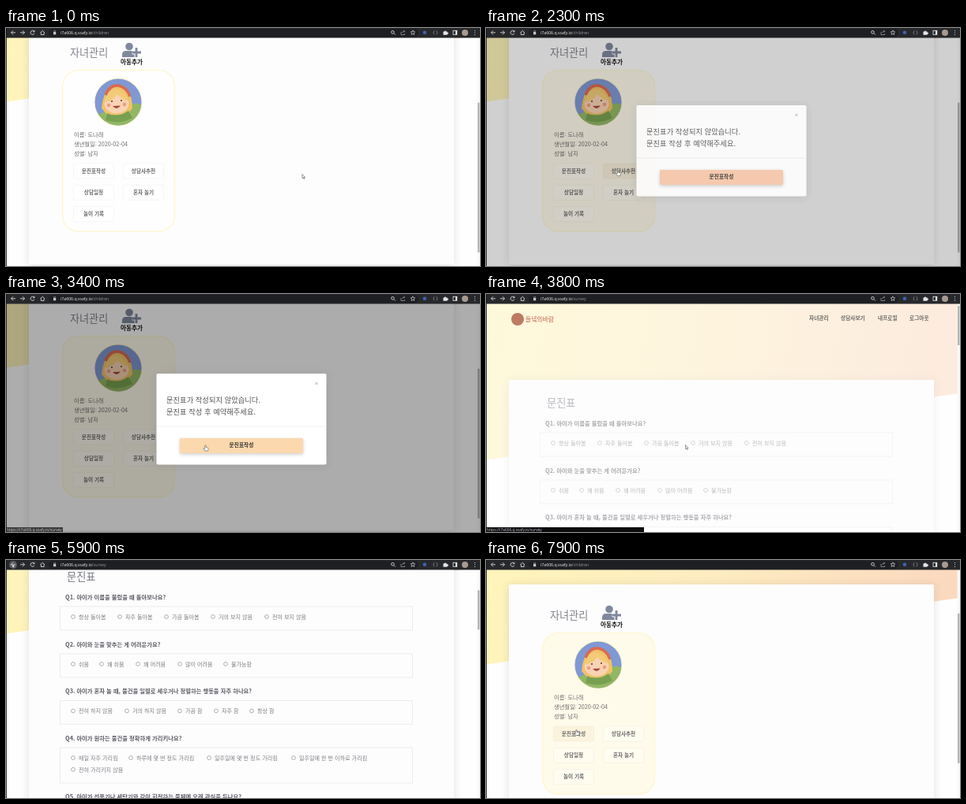
These frames come from a looping animation (600 px wide and 302 px high, 8 s). An HTML page:

```html
<!DOCTYPE html>
<html lang="ko">
<head>
<meta charset="utf-8">
<style>
  html, body { margin: 0; width: 100%; height: 100%; overflow: hidden; background: #fff; }
  svg { display: block; width: 600px; height: 302px; }
  text { font-family: "Noto Sans CJK KR", "Noto Sans CJK", "Noto Sans CJK JP", sans-serif; white-space: pre; }
  .chrome text { font-family: "Open Sans", "Noto Sans", sans-serif; }
</style>
</head>
<body>
<svg viewBox="0 0 600 302">
  <defs>
    <linearGradient id="sky" x1="0" y1="0" x2="1" y2=".06">
      <stop offset="0" stop-color="#fff5ba"/>
      <stop offset=".5" stop-color="#feecc0"/>
      <stop offset="1" stop-color="#fbd9bf"/>
    </linearGradient>
    <filter id="soft" x="-20%" y="-20%" width="140%" height="140%">
      <feDropShadow dx="0" dy="1" stdDeviation="5" flood-color="#445" flood-opacity=".17"/>
    </filter>
    <filter id="lift" x="-20%" y="-60%" width="140%" height="240%">
      <feDropShadow dx="0" dy="1.5" stdDeviation="2" flood-color="#000" flood-opacity=".2"/>
    </filter>
    <clipPath id="face"><circle cx="142" cy="211" r="29.5"/></clipPath>
  </defs>

  <rect width="600" height="302" fill="#fefefe"/>
  <g id="page">
    <g id="fading">
      <path d="M0 0H600V126L0 210.500Z" fill="url(#sky)"/>
      <rect id="sheet" x="29" y="109" width="538" rx="2" fill="#fefdfe" filter="url(#soft)"/>
      <g id="children">
        <g fill="#7f889d">
          <circle cx="156" cy="140.5" r="4.8"/>
          <path d="M147 154v-3q0-5 5-5h8q3 0 4 2v6Z"/>
          <path d="M165 142v12M159.500 148H171" stroke="#fefdfe" stroke-width="5"/>
          <path d="M165 142v12M159.500 148H171" stroke="#7f889d" stroke-width="2.800"/>
        </g>
        <rect id="profile" x="71.500" y="170.500" width="142" height="204.500" rx="20" stroke="#fdf7d6" stroke-width="1.600"/>
        <circle cx="142" cy="211" r="30.500" fill="#fbf3c4"/>
        <g clip-path="url(#face)">
          <rect x="110" y="180" width="64" height="64" fill="#8098d4"/>
          <path d="M110 243l4-13q5-6 14-7l28-8q9-5 16 0l3 28Z" fill="#93b765"/>
          <path d="M121 219q2-23 14-28q12-4 20 6q5 8 5 22l-7 8h-25Z" fill="#f0c269"/>
          <ellipse cx="140" cy="213" rx="15.500" ry="12.500" fill="#f9d3b3"/>
          <path d="M125 211q1-12 12-16q12 0 18 14q-9-1-14-8q-5 8-16 10Z" fill="#f3cb78"/>
          <path d="M126 202q5-13 16-12q11 2 15 14" fill="none" stroke="#d96a50" stroke-width="3.500"/>
          <path d="M128 225q12 7 27-3l5 9q-16 9-34 3Z" fill="#78a050"/>
          <g fill="#4a332e"><circle cx="134" cy="210" r="1"/><circle cx="146" cy="209" r="1"/></g>
          <g fill="#ee9c84"><circle cx="130" cy="215" r="2.300"/><circle cx="150" cy="214" r="2.300"/></g>
          <path d="M135 216q5 6 10-.500Z" fill="#a8483e"/>
        </g>
      </g>
      <g id="survey"></g>
    </g>
    <g id="nav"><circle cx="40" cy="32" r="8" fill="#bd7b62"/></g>
  </g>

  <rect x="596.500" y="13" width="3.500" height="289" fill="#f8f8f8"/>
  <rect id="thumb" x="597" width="2.500" fill="#b4b6b6"/>
  <rect id="dim" y="12" width="600" height="290"/>
  <g id="modal">
    <rect x="190.500" y="101" width="215" height="115.500" rx="2" fill="#fff" filter="url(#soft)"/>
    <path d="M391.500 112l3 3m0-3l-3 3" stroke="#9a9a9a" stroke-width=".7"/>
    <path d="M191 168H405" stroke="#ececee" stroke-width=".8"/>
    <rect id="action" x="220" y="183" width="156" height="19" rx="1.500" filter="url(#lift)"/>
  </g>

  <g class="chrome">
    <rect width="600" height="12.500" fill="#27282b"/>
    <rect x="54" y="1" width="468" height="10.500" rx="5" fill="#1e1f22"/>
    <circle id="backGlow" cx="9" cy="6" r="5" fill="#5a5b5e"/>
    <g fill="none" stroke="#d8d9db" stroke-width=".9">
      <path d="M12 5.800H6.500m2.500-2.500l-2.500 2.500l2.500 2.500M18 5.800h5.500m-2.500-2.500l2.500 2.500l-2.500 2.500"/>
      <path d="M35.500 4.200a2.500 2.500 0 1 0 .4 2.500M36 2.800v2h-2"/>
      <path d="M43.500 6l2.700-2.700L49 6M44.300 5.500v3h3.800v-3"/>
      <circle cx="489.500" cy="5.300" r="1.800"/><path d="M491 6.800l1.800 1.800"/>
      <path d="M500 5v3.500h4.500V7M501.500 6q.5-2 3-2m-1-1.300l1.300 1.300l-1.300 1.300" stroke-width=".7" stroke="#a5a6a9"/>
      <path d="M515 2.800l.8 2 2 .1-1.500 1.400.5 2.100-1.800-1.100-1.800 1.100.5-2.100-1.500-1.400 2-.1Z" stroke-width=".7"/>
      <path d="M542 3.300q-2 2.500 0 5M545 3.300q2 2.500 0 5" stroke="#9a9ca0" stroke-width=".7"/>
    </g>
    <rect x="60" y="5" width="3.200" height="3.300" fill="#c8c9cb"/>
    <path d="M60.600 5v-.7a1 1 0 0 1 2 0V5" fill="none" stroke="#c8c9cb" stroke-width=".6"/>
    <circle cx="530" cy="5.800" r="2.300" fill="#3f63b4"/>
    <path d="M553.500 4.500h1.500a1 1 0 1 1 2 0h1.500v1.300a1 1 0 1 1 0 1.800v1.200h-5Z" fill="#e6e6e8"/>
    <rect x="566" y="3.300" width="4.800" height="5" fill="none" stroke="#eee" stroke-width=".8"/>
    <rect x="569" y="3.300" width="2" height="5" fill="#eee"/>
    <circle cx="581" cy="6" r="4" fill="#a89a90"/>
    <path d="M593.500 3v.9m0 1.600v.9m0 1.600v.9" stroke="#ddd" stroke-width="1"/>
    <text x="69" y="7.800" font-size="5.200" fill="#f1f1f1">i7a606.q.ssafy.io<tspan id="path" fill="#96989c"></tspan></text>
    <g id="status">
      <rect id="statusBox" y="296" height="6" fill="#0c0c0e"/>
      <text x="1" y="300.500" font-size="4.800" fill="#c2c4c8">https://i7a606.q.ssafy.io/survey</text>
    </g>
  </g>
  <rect width=".8" height="302" fill="#111"/>
  <g id="cursor" stroke="#555" stroke-width=".6" stroke-linejoin="round" fill="#fff">
    <path id="arrow" d="M0 0v5.200l1.200-1 .9 1.900 .8-.4-.9-1.800h1.600Z"/>
    <path id="hand" d="M-.7.700q.7-1 1.400 0v2.500l2.500.6q.6.300.4 1.200l-.5 2.500H-.6l-2-2.800q.2-.9 1.900.2Z"/>
  </g>
</svg>
<script>
const SVG = "http://www.w3.org/2000/svg";
const $ = id => document.getElementById(id);
const set = (node, attrs) => { for (const k in attrs) node.setAttribute(k, attrs[k]); return node; };
const add = (parent, tag, attrs) => parent.appendChild(set(document.createElementNS(SVG, tag), attrs));

// y is the vertical middle of the line
function label(parent, str, x, y, size, fill, weight = 400, anchor = "start") {
  add(parent, "text", { x, y: y + size * 0.36, "font-size": size, fill,
    "font-weight": weight, "text-anchor": anchor }).textContent = str;
}

const children = $("children"), survey = $("survey"), nav = $("nav"), modal = $("modal");

label(nav, "들녘의바람", 50, 32.5, 7.8, "#c2604f", 500);
[["자녀관리", 409], ["상담사보기", 449], ["내프로필", 496], ["로그아웃", 536]]
  .forEach(([s, x]) => label(nav, s, x, 30.5, 6.7, "#6c6a68", 700));

label(children, "자녀관리", 81, 148, 13.1, "#80828a", 500);
label(children, "아동추가", 145, 160, 7.6, "#151515", 700);
["이름: 도나래", "생년월일: 2020-02-04", "성별: 남자"]
  .forEach((s, i) => label(children, s, 86, 252.5 + i * 11.8, 7.25, "#6c6c6c"));
const buttons = ["문진표작성", "상담사추천", "상담일정", "혼자 놀기", "놀이 기록"].map((s, i) => {
  const x = 111 + (i % 2) * 63, y = 298.5 + (i >> 1) * 27.3;
  const box = add(children, "rect", { x: x - 25.5, y: y - 9.5, width: 51, height: 19, rx: 2,
    stroke: "#a09c8c", "stroke-opacity": 0.11, "stroke-width": 0.8 });
  label(children, s, x, y, 6.6, "#6a6a6a", 700, "middle");
  return box;
});

const questions = [
  ["아이가 이름을 불렀을 때 돌아보나요?", 164,
    ["항상 돌아봄", 85], ["자주 돌아봄", 144], ["가끔 돌아봄", 203], ["거의 보지 않음", 262], ["전혀 보지 않음", 330]],
  ["아이와 눈을 맞추는 게 어려운가요?", 224,
    ["쉬움", 85], ["꽤 쉬움", 121], ["꽤 어려움", 167], ["많이 어려움", 220], ["불가능함", 278]],
  ["아이가 혼자 놀 때, 물건을 일렬로 세우거나 정렬하는 행동을 자주 하나요?", 283.5,
    ["전혀 하지 않음", 85], ["거의 하지 않음", 153], ["가끔 함", 220], ["자주 함", 266], ["항상 함", 311]],
  ["아이가 원하는 물건을 정확하게 가리키나요?", 343,
    ["매일 자주 가리킴", 85], ["하루에 몇 번 정도 가리킴", 158], ["일주일에 몇 번 정도 가리킴", 257],
    ["일주일에 한 번 이하로 가리킴", 364], ["전혀 가리키지 않음", 85, 1]],
  ["아이가 선풍기나 세탁기와 같이 회전하는 물체에 오래 관심을 두나요?", 417.5]
];
label(survey, "문진표", 77, 138, 13.2, "#777982", 500);
questions.forEach(([title, y, ...options], i) => {
  label(survey, `Q${i + 1}. ${title}`, 75, y + 0.3, 7.32, "#5c5b64", 700);
  if (!options.length) return;
  add(survey, "rect", { x: 68.5, y: y + 12, width: 446, height: options.some(o => o[2]) ? 45 : 30,
    fill: "none", stroke: "#e9e9ec", "stroke-width": 0.9 });
  options.forEach(([s, x, row = 0]) => {
    const cy = y + 25 + row * 14.8;
    add(survey, "circle", { cx: x, cy, r: 2.4, fill: "#fff", stroke: "#8d8d92", "stroke-width": 0.7 });
    label(survey, s, x + 7, cy + 0.2, 7.1, "#7c7c80");
  });
});

label(modal, "문진표가 작성되지 않았습니다.", 203, 135, 9.3, "#555");
label(modal, "문진표 작성 후 예약해주세요.", 203, 150, 9.3, "#555");
label(modal, "문진표작성", 298, 192, 6.7, "#333", 700, "middle");

const clamp = x => Math.max(0, Math.min(1, x));
const ramp = (t, from, to) => clamp((t - from) / (to - from));
const smooth = p => p * p * (3 - 2 * p);
const easeOut = p => 1 - (1 - p) ** 2;
const show = (node, on) => node.setAttribute("display", on ? "inline" : "none");

const DURATION = 8000, OPEN = 2200, TO_SURVEY = 3600, TO_CHILDREN = 6200;
const cursorPath = [
  [0, 375, 185.5], [200, 375, 185.5], [900, 205, 186], [1500, 167, 180], [2450, 167, 180], [2900, 252.5, 191.5],
  [5000, 252.5, 191.5], [5700, 8, 4.5], [6200, 8, 4.5], [6600, 141, 121], [7000, 141, 136], [7700, 114.5, 215]
];

function cursorAt(t) {
  const i = cursorPath.findIndex(k => k[0] > t);
  if (i < 0) return cursorPath[cursorPath.length - 1].slice(1);
  const [t0, x0, y0] = cursorPath[i - 1], [t1, x1, y1] = cursorPath[i];
  const p = smooth(ramp(t, t0, t1));
  return [x0 + (x1 - x0) * p, y0 + (y1 - y0) * p];
}

function scrollAt(t) {
  if (t < TO_SURVEY) return 117;
  if (t < TO_CHILDREN) return 117 * smooth(ramp(t, 4300, 5100));
  return 78 * smooth(ramp(t, 6900, 7500));
}

function render(t) {
  const onSurvey = t >= TO_SURVEY && t < TO_CHILDREN;
  const scroll = scrollAt(t);
  const [x, y] = cursorAt(t);

  set($("page"), { transform: `translate(0 ${-scroll})` });
  show(survey, onSurvey);
  show(children, !onSurvey);
  set($("sheet"), { height: onSurvey ? 1330 : 308 });
  const fade = onSurvey ? ramp(t, 3550, 4050) : t >= TO_CHILDREN ? ramp(t, 6150, 6550) : 1;
  set($("fading"), { opacity: fade });
  const thumb = onSurvey ? { y: 15 + scroll * 0.2, height: 50 } : { y: 14 + scroll * 0.69, height: 190 };
  set($("thumb"), thumb);
  $("path").textContent = onSurvey ? "/survey" : "/children";

  const hover = Math.max(t < TO_SURVEY ? ramp(t, 850, 1050) : 0, ramp(t, 7150, 7400));
  set($("profile"), { fill: `rgb(255,${254 - 3 * hover},${254 - 19 * hover})` });
  buttons.forEach((box, i) => {
    const active = i === 0 && t > 7550 || i === 1 && t > 1250 && t < 2450;
    set(box, { fill: active ? "#fbf3dd" : "#fff", "fill-opacity": active ? 1 : 0.25 });
  });

  const open = t >= OPEN && t < TO_SURVEY ? easeOut(ramp(t, OPEN, OPEN + 300)) : 0;
  set($("dim"), { opacity: 0.32 * open });
  set(modal, { opacity: Math.min(1, open * 1.6), transform: `translate(0 ${-7 * (1 - open)})` });
  const onAction = t >= 2750;
  set($("action"), { fill: onAction ? "#fbd8ad" : "#fac9ab" });

  show($("status"), t >= 2800 && t < 4000);
  set($("statusBox"), { width: t < TO_SURVEY ? 72 : 200, "fill-opacity": t < TO_SURVEY ? 0.7 : 1 });
  show($("backGlow"), t >= 5650 && t < 6300);

  const pointing = t > 1250 && t < 2350 || t >= 2750 && t < TO_SURVEY || t > 7550;
  show($("hand"), pointing);
  show($("arrow"), !pointing);
  set($("cursor"), { transform: `translate(${x} ${y})` });
}

const start = performance.now();
(function tick() {
  render((performance.now() - start) % DURATION);
  requestAnimationFrame(tick);
})();
</script>
</body>
</html>
```
